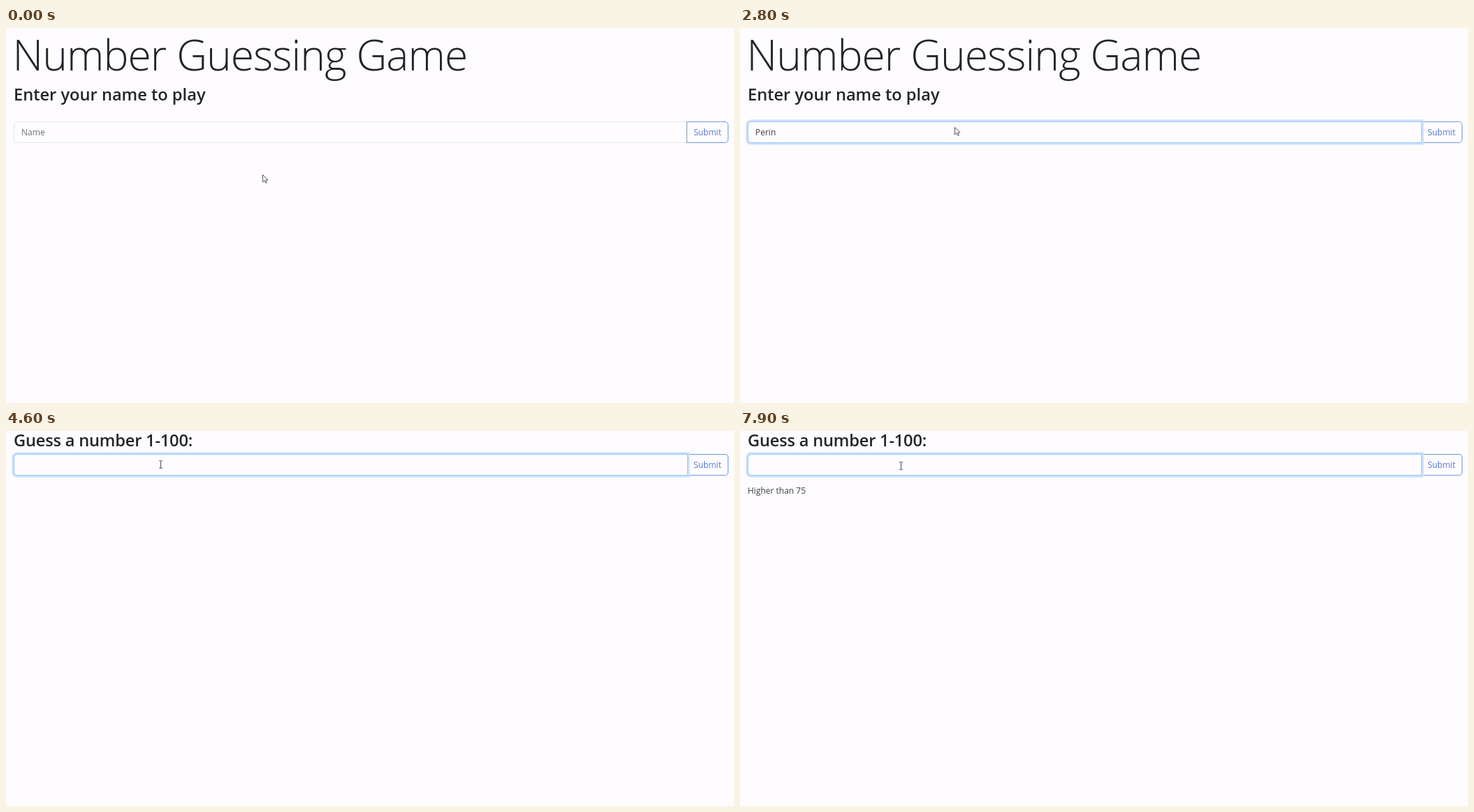
Animation of 1042 by 538 pixels, one loop 8 s. Source, as an HTML page:

```html
<!DOCTYPE html>
<html lang="en">
<head>
<meta charset="utf-8">
<title>Number Guessing Game</title>
<style>
  html, body { margin: 0; width: 100%; height: 100%; overflow: hidden; background: #fefcff; }
  body { position: relative; font: 12px "Open Sans", "Noto Sans", sans-serif; color: #3c4045; }
  h1, h2, p, .form, .field, .button, svg { position: absolute; margin: 0; box-sizing: border-box; white-space: pre; }
  h1 { left: 9.5px; top: 3px; font-size: 60.5px; line-height: 70px; font-weight: 300; letter-spacing: -.93px; color: #212529; }
  h2 { left: 11px; top: 80px; font-size: 23.65px; line-height: 30px; font-weight: 600; color: #212529; }
  p { left: 11px; top: 76px; line-height: 20px; }
  .form { left: 11px; top: 134px; width: 1023px; height: 31px; line-height: 29px; }
  .field { left: 0; top: 0; width: 964px; height: 31px; padding-left: 10px; border: 1px solid #e4e6eb; border-radius: 5px 0 0 5px; }
  .button { left: 963px; top: 0; width: 60px; height: 31px; text-align: center; color: #4f79d2; border: 1px solid #6b9ae2; border-left-color: #8796ac; border-radius: 0 5px 5px 0; }
  .active .button { border-left-color: #e4e6eb; }
  .glow .field { z-index: 1; width: 965px; background: #fefcff; border-color: #9ac5f8; box-shadow: 0 0 0 2.5px #c9e0fb; }
  .empty { color: #6c7076; }
  #caret { display: inline-block; width: 1px; height: 16px; margin-right: -1px; vertical-align: -4px; background: #444; }
  .guess h1 { display: none; }
  .guess h2 { top: -2px; letter-spacing: -.2px; }
  .guess .form { top: 33px; }
  svg { left: 0; top: 0; width: 1042px; height: 538px; z-index: 2; }
</style>
</head>
<body>
<h1>Number Guessing Game</h1>
<h2 id="title"></h2>
<div class="form" id="form">
  <div class="field"><span id="typed"></span><span id="caret"></span><span class="empty" id="hint">Name</span></div>
  <div class="button">Submit</div>
</div>
<p id="result"></p>
<svg>
  <g id="pointer">
    <path id="arrow" d="M.5 .5V11L3 8.7L4.8 12.5L6.4 11.8L4.7 8.1H8Z" fill="#fff" stroke="#55585e" stroke-width="1"/>
    <path id="beam" d="M4 .8H6L6.5 1.3L7 .8H9M6.5 1.3V10.7M4 11.2H6L6.5 10.7L7 11.2H9" fill="none" stroke="#55585e" stroke-width="1.1"/>
  </g>
</svg>
<script>
  const LOOP = 8000, STEP = 100, BLINK = 530;
  const NAME_CLICK = 1000, LOADING = 2700, GUESS_PAGE = 3000, GUESS_CLICK = 4000;

  // [time, x, y] of the pointer tip
  const path = [[0, 367, 210], [200, 367, 210], [800, 307, 142], [3300, 307, 142],
                [3800, 215, 42], [7200, 215, 42], [7500, 224, 44], [LOOP, 224, 44]];

  // [time, text in the field]
  const name = "Perin";
  const typing = [[0, ""],
    ...[1500, 1700, 1900, 2050, 2250].map((at, i) => [at, name.slice(0, i + 1)]),
    [GUESS_PAGE, ""], [4700, "5"], [4900, "50"], [5200, ""],
    [6700, "7"], [6900, "75"], [7200, ""]];

  const results = [[0, ""], [5200, "Higher than 50"], [7200, "Higher than 75"]];

  // moments that restart the caret's blinking
  const keys = [NAME_CLICK, ...typing.filter(k => k[1]).map(k => k[0]), GUESS_CLICK].sort((a, b) => a - b);

  const $ = id => document.getElementById(id);
  const show = (id, on) => { $(id).style.display = on ? "" : "none"; };
  const setText = (id, text) => { if ($(id).textContent !== text) $(id).textContent = text; };
  const last = (list, t) => list.filter(k => k[0] <= t).pop()[1];

  function position(t) {
    const i = path.findIndex(p => p[0] > t);
    const [t0, x0, y0] = path[i - 1], [t1, x1, y1] = path[i];
    const u = (t - t0) / (t1 - t0), e = u * u * (3 - 2 * u);
    return [x0 + (x1 - x0) * e, y0 + (y1 - y0) * e];
  }

  function draw(t) {
    const guess = t >= GUESS_PAGE;
    const click = guess ? GUESS_CLICK : NAME_CLICK;
    const active = t >= click;
    const text = last(typing, t);

    document.body.classList.toggle("guess", guess);
    $("form").classList.toggle("active", active);
    $("form").classList.toggle("glow", t > click + STEP);
    setText("title", guess ? "Guess a number 1-100:" : "Enter your name to play");
    setText("typed", text);
    setText("result", last(results, t));
    show("hint", !guess && !text);

    const key = keys.filter(k => k <= t).pop();
    show("caret", active && (t - key) % (2 * BLINK) < BLINK);

    const [x, y] = position(t);
    const top = guess ? 33 : 134;
    const loading = t >= LOADING && t < GUESS_PAGE;
    const inField = y + 6 > top && y + 6 < top + 31 && !loading;
    $("pointer").setAttribute("transform", `translate(${x} ${y})`);
    show("beam", inField);
    show("arrow", !inField);
  }

  const start = performance.now();
  function tick() {
    const t = (performance.now() - start) % LOOP;
    draw(Math.floor(t / STEP) * STEP);
    requestAnimationFrame(tick);
  }
  tick();
</script>
</body>
</html>
```
